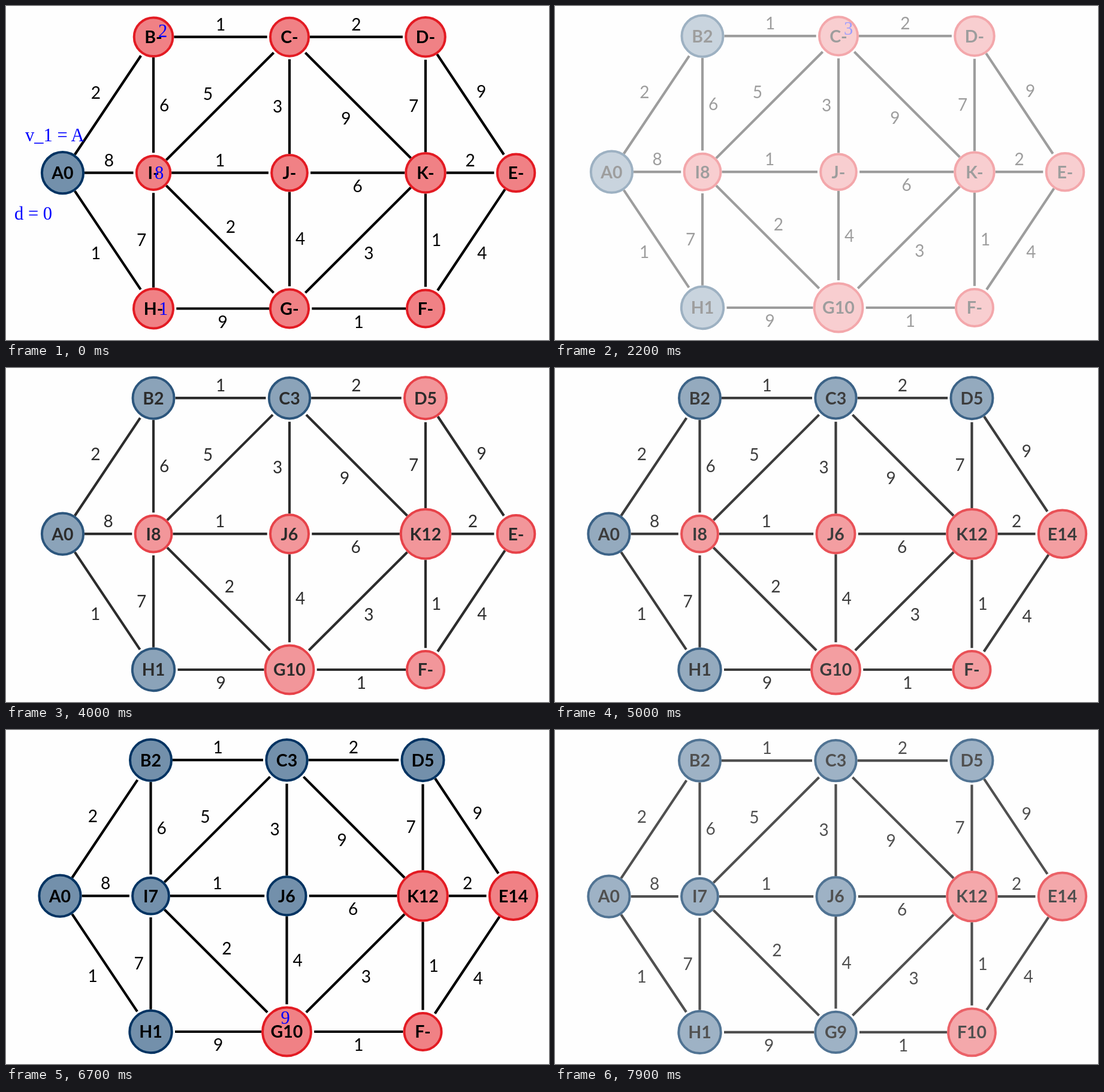
Write an HTML page that moves like this. It is 906 by 558 pixels and loops after 8000 ms.

```html
<!DOCTYPE html>
<html lang="en">
<head>
<meta charset="utf-8">
<title>Shortest paths</title>
<style>
  html, body { margin: 0; width: 100%; height: 100%; overflow: hidden; background: #fefefe; }
  svg { display: block; }
  line { stroke: #000; stroke-width: 4.2; }
  circle { fill: #f08185; stroke: #e31b23; stroke-width: 4; }
  .done { fill: #7390ab; stroke: #003362; }
  text { font: 28px Lato, sans-serif; text-anchor: middle; }
  .name { font-weight: bold; font-size: 28.5px; }
  .note { font: 30.5px "Liberation Serif", serif; fill: #00f; text-anchor: start; }
</style>
</head>
<body>
<svg width="906" height="558" viewBox="0 0 906 558"><g id="graph"></g></svg>
<script>
const LOOP = 8000, TICK = 100, FADE = 500;
const cols = [94.5, 246, 473, 700, 851], rows = [51.7, 278.7, 505.5];

// name: column, row, radius of the circle while the distance is unknown
const nodes = {
  A: [0, 1, 32.4], B: [1, 0, 32.3], C: [2, 0, 32], D: [3, 0, 32.8],
  E: [4, 1, 31.3], F: [3, 2, 31], G: [2, 2, 32], H: [1, 2, 33],
  I: [1, 1, 28.2], J: [2, 1, 29.8], K: [3, 1, 32.8]
};
const growth = { '-': 0, 1: 2.2, 2: 8.4 };

// two ends (the line stops short of the second), weight, side of the label
const edges = `AB2nw AI8n AH1sw BC1n BI6e HI7w IC5nw IJ1n IG2ne CD2n JC3w
  KJ6s KD7w KC9sw KG3se KF1e KE2n DE9ne EF4se JG4e FG1s GH9s`.split(/\s+/);

// visited node, then each improved distance with the offset of its note
const steps = [
  ['A', ['B', 2, 8, 0], ['I', 8, 2, 10], ['H', 1, 9, 10]],
  ['H', ['G', 10, 8, 0]],
  ['B', ['C', 3, 9, -2]],
  ['C', ['J', 6, 8, 0], ['K', 12, 8, 0], ['D', 5, 8, 0]],
  ['D', ['E', 14, 8, 0]],
  ['J', ['I', 7, 2, 10]],
  ['I', ['G', 9, -10, -13]],
  ['G', ['F', 10, 8, 10]]
];

// each step has two slides: notes first, then the updated graph
const starts = [-600, 445, 1010, 1608, 2137, 2710, 3310, 3805,
  4312, 4832, 5312, 5810, 6310, 6742, 7240, 7760];

const text = (x, y, s, cls = '') => `<text x="${x}" y="${y}" class="${cls}">${s}</text>`;

function drawSlide(k) {
  const step = k >> 1, updated = k & 1;
  const dist = { A: 0 }, done = new Set();
  steps.slice(0, step + 1).forEach(([name, ...found], i) => {
    done.add(name);
    if (i < step || updated) for (const [n, d] of found) dist[n] = d;
  });

  // the graph stays centred as its outer circles grow
  const dx = k < 9 ? 0 : -4.5;
  const dy = k < 3 || k === 13 || k === 14 ? 0 : k === 15 ? -0.6 : -1.5;
  const place = {};
  for (const n in nodes) {
    const [c, r, base] = nodes[n], label = String(dist[n] ?? '-');
    const size = growth[label === '-' ? '-' : label.length];
    place[n] = { x: cols[c] + dx, y: rows[r] + dy, r: base + size, label };
  }

  let out = '';
  for (const [from, to, weight, ...side] of edges) {
    const a = place[from], b = place[to];
    const len = Math.hypot(b.x - a.x, b.y - a.y);
    const ux = (b.x - a.x) / len, uy = (b.y - a.y) / len;
    const ra = a.r + 2, rb = b.r + 5.3;
    const x1 = a.x + ux * ra, y1 = a.y + uy * ra, x2 = b.x - ux * rb, y2 = b.y - uy * rb;
    const sx = side.includes('e') ? 18 : side.includes('w') ? -20 : 0;
    const sy = side.includes('s') ? 22 : side.includes('n') ? -21 : 0;
    out += `<line x1="${x1}" y1="${y1}" x2="${x2}" y2="${y2}"/>`;
    out += text((x1 + x2) / 2 + sx, (y1 + y2) / 2 + sy + 10, weight);
  }
  for (const n in place) {
    const { x, y, r, label } = place[n];
    out += `<circle cx="${x}" cy="${y}" r="${r}" class="${done.has(n) ? 'done' : ''}"/>`;
    out += text(x, y + 10.3, n + label, 'name');
  }
  if (!updated)
    for (const [n, d, ox, oy] of steps[step].slice(1))
      out += text(place[n].x + ox, place[n].y + oy, d, 'note');
  if (k === 0) out += text(32, 225.5, 'v_1 = A', 'note') + text(14, 357, 'd = 0', 'note');
  return out;
}

const graph = document.getElementById('graph');
const origin = performance.now();
let shown = -1;

function frame() {
  const now = Math.max(0, performance.now() - origin) + 4;
  const t = Math.floor(now % LOOP / TICK) * TICK;
  const k = starts.findLastIndex(s => s <= t);
  if (k !== shown) graph.innerHTML = drawSlide(shown = k);
  const p = Math.min(1, (t - starts[k]) / FADE);
  graph.setAttribute('opacity', 1 - (1 - p) ** 3.5);
  requestAnimationFrame(frame);
}
frame();
</script>
</body>
</html>
```
